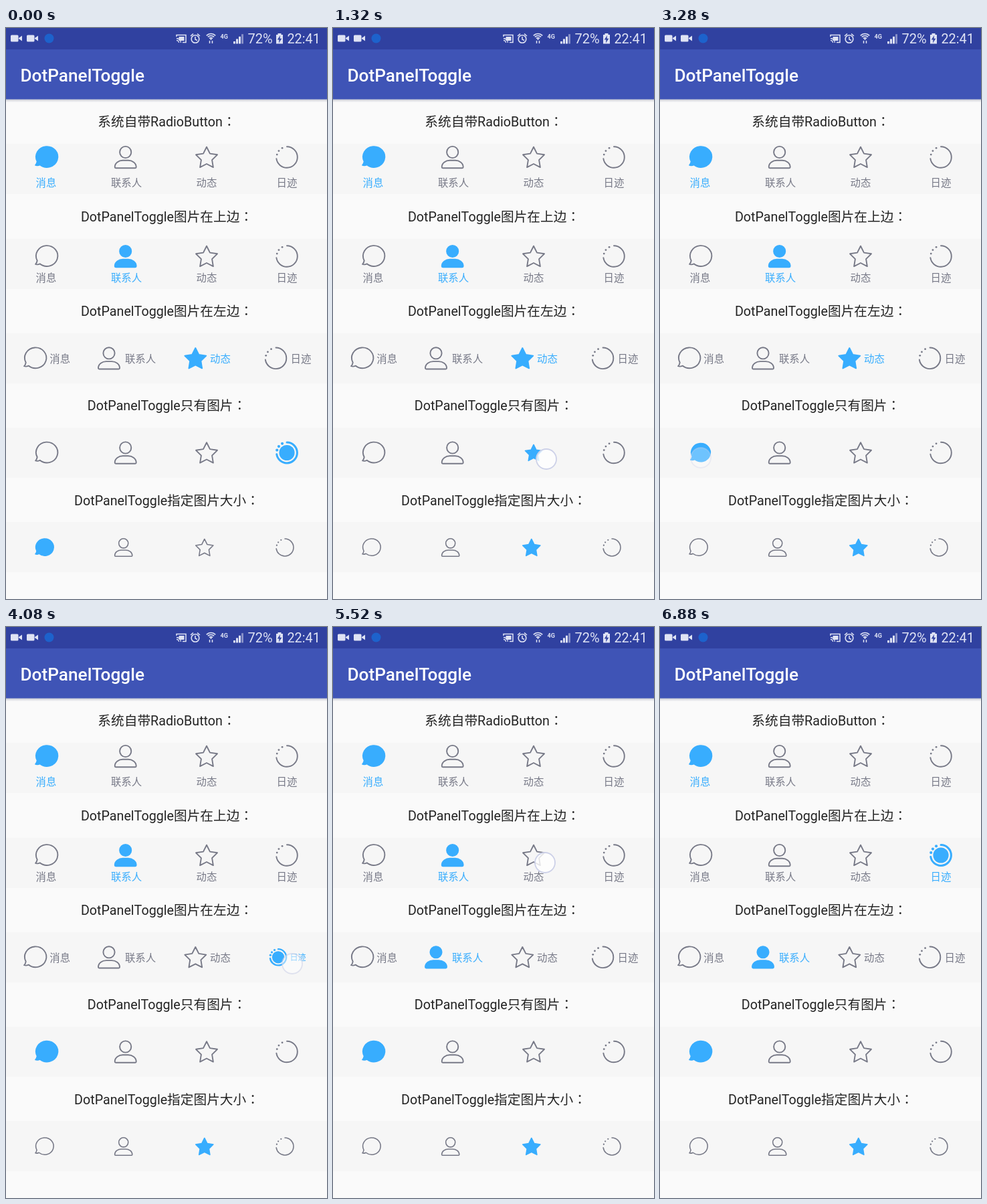
Recreate the animation shown at these times as an HTML page with a canvas. Size 480 by 853 pixels, loop 6.94 s.

```html
<!DOCTYPE html>
<html lang="zh-CN">
<head>
<meta charset="utf-8">
<style>
html, body { margin: 0; width: 480px; height: 853px; overflow: hidden; background: #fafafa; }
canvas { display: block; }
</style>
</head>
<body>
<canvas width="480" height="853"></canvas>
<script>
const LOOP = 6940, DIP = 560, FADE = 200;
const GREY = '#777987', BLUE = '#38adfe', PALE = '#dfe3f4';
const FONT = 'Roboto, "Noto Sans CJK SC", "Noto Sans CJK", sans-serif';
const COLON = '"Noto Sans CJK JP", "Noto Sans CJK", sans-serif';
const c = document.querySelector('canvas').getContext('2d');

const LABELS = ['消息', '联系人', '动态', '日迹'];
const NAME = 'DotPanelToggle';
const HEADINGS = ['系统自带RadioButton', NAME + '图片在上边', NAME + '图片在左边',
  NAME + '只有图片', NAME + '指定图片大小'];
const START = [0, 1, 2, 3, 0];

// icon centres, icon size, pivot and optional label centres for each row
const TOP_X = [60.3, 178.7, 300, 420], COLS = [60, 180, 300, 420];
const ROWS = [
  { x: TOP_X, y: 193, size: 1, pivot: 210.5, labelX: COLS, labelY: 231.5 },
  { x: TOP_X, y: 341, size: 1, pivot: 352, labelX: COLS, labelY: 373 },
  { x: [43.3, 154, 283.3, 403.5], y: 493.3, size: 1, pivot: 493.3,
    labelX: [80.7, 201, 320.5, 441], labelY: 493.7 },
  { x: TOP_X, y: 634.5, size: 1, pivot: 634.5 },
  { x: [57.2, 175.7, 296.8, 417], y: 776, size: .82, pivot: 776 }
];

// row, column, touch x, touch y, touch start, selection, fade start
const TAPS = [
  [4, 2, 312, 777, 160, 480, 560],
  [3, 2, 319, 644, 820, 1140, 1340],
  [3, 1, 167, 644, 1700, 2140, 2240],
  [3, 0, 61, 642, 2840, 3190, 3150],
  [2, 3, 428, 503, 3540, 3900, 4000],
  [2, 1, 220, 503, 4290, 4712, 4860],
  [1, 2, 317, 352, 5240, 5580, 5680],
  [1, 3, 442, 352, 5960, 6320, 6270]
];

const BUBBLE = new Path2D('M-13.6 6.5A16.2 15.4 0 1 1-9.6 11.3Q-13 13-16.2 11.9Q-14.2 10-13.6 6.5Z');
const PERSON = new Path2D('M8.6-7.5A8.6 8.6 0 1 1-8.6-7.5A8.6 8.6 0 1 1 8.6-7.5Z' +
  'M-14.5 16.2H14.5Q16 16.2 16 14.7C16 8.5 10 4.8 4 4.8H-4C-10 4.8-16 8.5-16 14.7Q-16 16.2-14.5 16.2Z');
const STAR = new Path2D();
for (let i = 0; i < 10; i++) {
  const r = i % 2 ? 8.5 : 16.8, a = i * Math.PI / 5;
  STAR.lineTo(r * Math.sin(a), 1.5 - r * Math.cos(a));
}
STAR.closePath();
const SHAPES = [BUBBLE, PERSON, STAR];

const rad = deg => deg * Math.PI / 180;

function rect(color, x, y, w, h) {
  c.fillStyle = color;
  c.fillRect(x, y, w, h);
}

function disc(x, y, r) {
  c.beginPath();
  c.arc(x, y, r, 0, 7);
  c.fill();
}

function arc(x, y, r, from, to) {
  c.beginPath();
  c.arc(x, y, r, rad(from), rad(to));
  c.stroke();
}

function line(d, width) {
  c.lineWidth = width;
  c.stroke(new Path2D(d));
}

function text(s, x, y, size, color, align = 'left', weight = 400, family = FONT) {
  c.font = `${weight} ${size}px ${family}`;
  c.fillStyle = color;
  c.textAlign = align;
  c.fillText(s, x, y);
}

function icon(kind, x, y, size, on) {
  c.save();
  c.translate(x, y);
  c.scale(size, size);
  c.strokeStyle = c.fillStyle = on ? BLUE : GREY;
  c.lineWidth = 1.9;
  c.lineJoin = c.lineCap = 'round';
  if (kind < 3) {
    c.stroke(SHAPES[kind]);
    if (on) c.fill(SHAPES[kind]);
  } else {
    if (on) {
      c.lineWidth = 3;
      disc(0, 0, 11.6);
    }
    arc(0, 0, on ? 15.4 : 15.8, -90, 172);
    for (const a of [195, 218, 243])
      disc(15.3 * Math.cos(rad(a)), 15.3 * Math.sin(rad(a)), on ? 2.1 : 1.4);
  }
  c.restore();
}

function statusBar() {
  rect('#3041a0', 0, 0, 480, 32);
  c.fillStyle = c.strokeStyle = PALE;
  c.lineCap = 'butt';
  c.lineJoin = 'miter';
  for (const x of [7, 31]) {
    c.beginPath();
    c.roundRect(x, 10.5, 11.5, 10, 1.5);
    c.fill();
    c.fill(new Path2D(`M${x + 12} 15L${x + 17} 11.5V19.5L${x + 12} 16Z`));
  }
  c.fillStyle = '#1d62cc';
  disc(64.5, 15.5, 7);

  // cast
  c.strokeStyle = c.fillStyle = PALE;
  line('M255 13V10.5H269V21.5H264', 1.5);
  c.lineWidth = 1.3;
  arc(255, 22, 3.5, -90, 0);
  arc(255, 22, 6.5, -90, 0);
  c.fillRect(258.5, 13, 8, 6);
  // alarm
  c.lineWidth = 1.6;
  arc(283, 16.5, 5.8, 0, 360);
  line('M283 13V17L286 18.5M276 12L280 8.7M290 12L286 8.7', 1.5);
  // wireless
  c.lineWidth = 1.7;
  for (const r of [3.5, 6.5, 9.5]) arc(306.5, 18, r, -135, -45);
  disc(306.5, 16.5, 1.3);
  line('M304.5 19V23M308.5 19V23', 1.5);
  text('4G', 320.5, 15.5, 9, PALE, 'left', 700);
  // signal
  for (let i = 0; i < 4; i++)
    rect(i < 3 ? PALE : '#8790c8', 340 + i * 4, 20 - i * 3.6, 3, 3.5 + i * 3.6);
  text('72%', 361.5, 23, 20, PALE);
  // battery
  rect(PALE, 404, 10, 10, 13.5);
  rect(PALE, 406.5, 8, 5, 2);
  c.fillStyle = '#3041a0';
  c.fill(new Path2D('M410 11L405.8 17.5H408.5L408 22.5L412.3 15.8H409.5Z'));
  text('22:41', 420.5, 23, 19.8, PALE);
}

function header() {
  const shade = c.createLinearGradient(0, 106, 0, 111);
  shade.addColorStop(0, '#c3c5d0');
  shade.addColorStop(1, '#fafafa');
  rect(shade, 0, 106, 480, 5);
  rect('#3f54b6', 0, 32, 480, 74.5);
  text(NAME, 21.5, 79.5, 26.2, '#fff', 'left', 500);
}

function heading(s, y) {
  const size = 19.7;
  c.font = `400 ${size}px ${FONT}`;
  const w = c.measureText(s).width, x = 240.5 - (w + size) / 2;
  text(s, x, y, size, '#242424');
  text('：', x + w, y, size, '#242424', 'left', 400, COLON);
}

function button(row, col, on, scale) {
  const r = ROWS[row], px = COLS[col];
  c.save();
  c.translate(px, r.pivot);
  c.scale(scale, scale);
  c.translate(-px, -r.pivot);
  icon(col, r.x[col], r.y, r.size, on);
  if (r.labelX)
    text(LABELS[col], r.labelX[col], r.labelY + 5.8, 15.4, on ? BLUE : GREY, 'center');
  c.restore();
}

function touch(x, y, alpha) {
  c.globalAlpha = alpha;
  c.beginPath();
  c.arc(x, y, 15, 0, 7);
  c.fillStyle = 'rgba(255,255,255,.8)';
  c.fill();
  c.strokeStyle = '#cdd1e8';
  c.lineWidth = 1.8;
  c.stroke();
  c.globalAlpha = 1;
}

function draw(t) {
  const chosen = [...START], since = [];
  for (const [row, col, , , , at] of TAPS)
    if (t >= at) {
      chosen[row] = col;
      since[row] = t - at;
    }

  rect('#fafafa', 0, 0, 480, 853);
  statusBar();
  header();
  ROWS.forEach((r, row) => {
    const top = row * 141.3;
    heading(HEADINGS[row], 147.3 + top);
    rect('#f6f6f6', 0, Math.round(173.2 + top), 480, 75);
    for (let col = 0; col < 4; col++) {
      const on = chosen[row] === col;
      const dip = on && since[row] < DIP ? Math.sin(Math.PI * since[row] / DIP) : 0;
      button(row, col, on, 1 - .25 * dip);
    }
  });
  for (const [, , x, y, start, , end] of TAPS) {
    const alpha = Math.min(1, (t - start) / 60, 1 - (t - end) / FADE);
    if (alpha > 0) touch(x, y, alpha);
  }
}

function frame() {
  draw(performance.now() % LOOP);
  requestAnimationFrame(frame);
}
frame();
</script>
</body>
</html>
```
